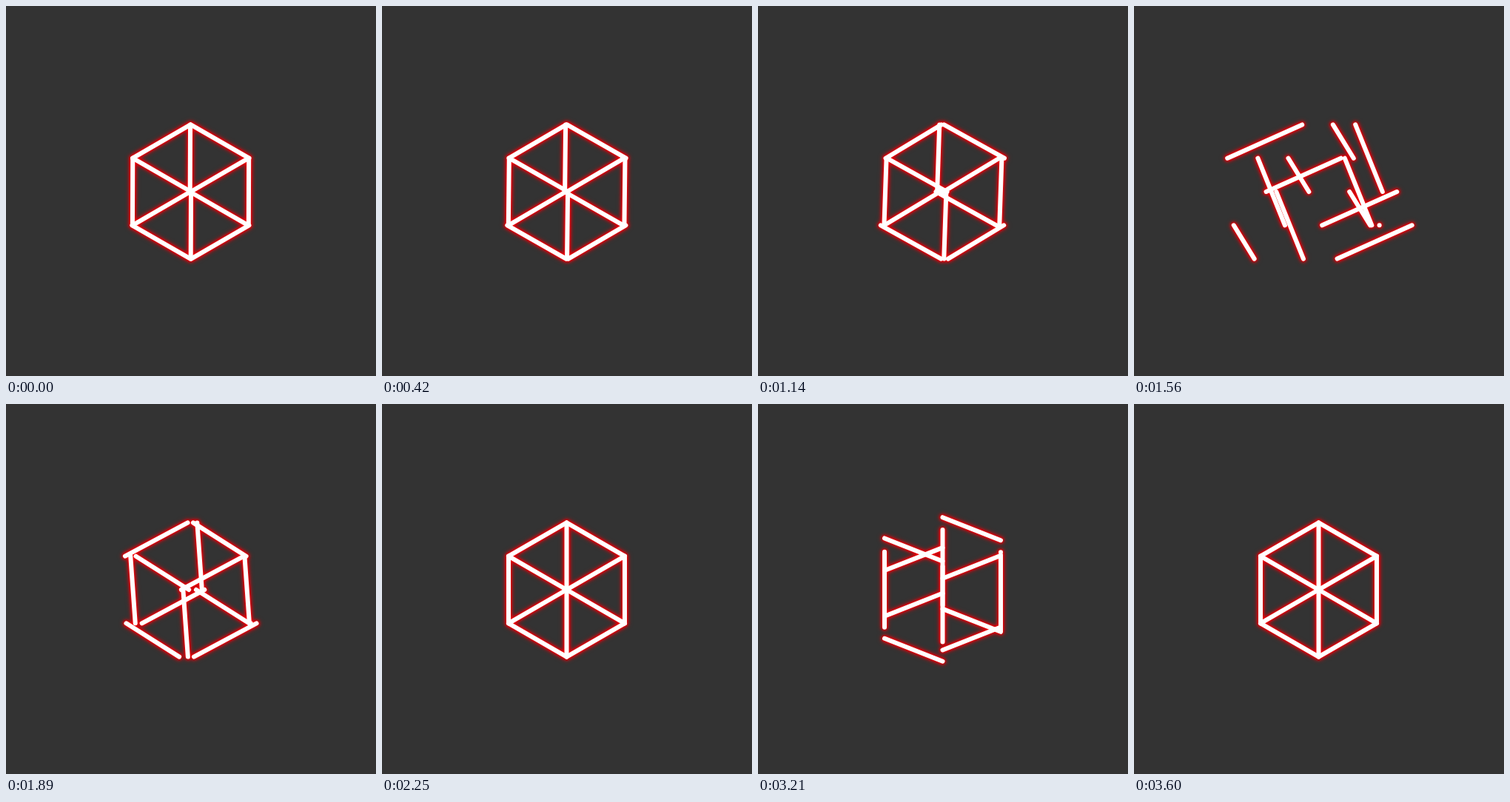
An HTML page without scripts for the animation above (3.63 s loop, 500x500 px).

```html
<!DOCTYPE html>
<html lang="en">
<head>
<meta charset="utf-8">
<title>Neon cube</title>
<style>
  @property --turn { syntax: "<angle>"; inherits: true; initial-value: 0deg; }
  @property --tilt { syntax: "<angle>"; inherits: true; initial-value: 0deg; }

  html, body { margin: 0; width: 100%; height: 100%; overflow: hidden; background: #333; }

  svg {
    --ct: cos(var(--turn)); --st: sin(var(--turn));
    --cp: cos(var(--tilt)); --sp: sin(var(--tilt));
    display: block; width: 100%; height: 100%;
    fill: none; stroke: #fff; stroke-width: 6; stroke-linecap: round;
    filter: drop-shadow(0 0 1px #f00) drop-shadow(0 0 2px #e6000c) drop-shadow(0 0 2.5px #d8000c);
    animation: turn 3630ms infinite, tilt 3630ms infinite;
  }

  /* Edge directions in space */
  .rise { --dx: 78.5; --dy: -45.3; --dz: 64; }
  .fall { --dx: 78.5; --dy: 45.3; --dz: -64; }
  .post { --dx: 0; --dy: 90.6; --dz: 64; }

  /* Orthographic view: turn about the vertical axis, then tilt about the horizontal one */
  path, circle {
    --px: calc(var(--x) * var(--ct) + var(--z) * var(--st));
    --py: calc(var(--y) * var(--cp) + (var(--z) * var(--ct) - var(--x) * var(--st)) * var(--sp));
  }
  path {
    --u: calc(var(--dx) * var(--ct) + var(--dz) * var(--st));
    --v: calc(var(--dy) * var(--cp) + (var(--dz) * var(--ct) - var(--dx) * var(--st)) * var(--sp));
    vector-effect: non-scaling-stroke;
    transform: matrix(var(--u), var(--v), calc(-1 * var(--v)), var(--u), var(--px), var(--py));
  }
  circle {
    fill: #fff; stroke: none;
    transform: matrix(1, 0, 0, 1, var(--px), var(--py));
  }

  @keyframes turn {
    0% { --turn: -.3deg; animation-timing-function: linear; }
    11.57% { --turn: -.9deg; animation-timing-function: linear; }
    31.4% { --turn: -2.8deg; animation-timing-function: ease-in; }
    34.99% { --turn: 0deg; animation-timing-function: cubic-bezier(.5, .1, .75, .6); }
    39.94% { --turn: 90deg; animation-timing-function: cubic-bezier(.3, .45, .7, .85); }
    42.98% { --turn: 145deg; animation-timing-function: cubic-bezier(.3, .45, .7, .75); }
    45.45% { --turn: 155deg; animation-timing-function: cubic-bezier(.3, .65, .5, 1); }
    60.33%, 100% { --turn: 180deg; }
  }
  @keyframes tilt {
    0%, 62% { --tilt: 0deg; animation-timing-function: linear; }
    70.8% { --tilt: -1deg; animation-timing-function: ease-in; }
    74.38% { --tilt: 0deg; animation-timing-function: cubic-bezier(.5, .1, .75, .6); }
    79.34% { --tilt: 92.5deg; animation-timing-function: cubic-bezier(.3, .45, .7, .85); }
    82.37% { --tilt: 146deg; animation-timing-function: cubic-bezier(.3, .45, .7, .75); }
    84.85% { --tilt: 156deg; animation-timing-function: cubic-bezier(.3, .65, .5, 1); }
    99.2%, 100% { --tilt: 180deg; }
  }
</style>
</head>
<body>
<svg viewBox="-249.5 -251 500 500">
  <path class="rise" d="M0 0H1" style="--x:-78.5;--y:-45.3;--z:-30"/>
  <path class="rise" d="M0 0H1" style="--x:0;--y:0;--z:-23"/>
  <path class="rise" d="M0 0H1" style="--x:-78.5;--y:45.3;--z:9"/>
  <path class="rise" d="M0 0H1" style="--x:0;--y:90.6;--z:-152"/>
  <path class="fall" d="M0 0H1" style="--x:0;--y:-90.6;--z:-39"/>
  <path class="fall" d="M0 0H1" style="--x:-78.5;--y:-45.3;--z:-60"/>
  <path class="fall" d="M0 0H1" style="--x:0;--y:0;--z:185"/>
  <path class="fall" d="M0 0H1" style="--x:-78.5;--y:45.3;--z:108"/>
  <path class="post" d="M0 0H1" style="--x:0;--y:-90.6;--z:87"/>
  <path class="post" d="M0 0H1" style="--x:0;--y:0;--z:-100"/>
  <path class="post" d="M0 0H1" style="--x:-78.5;--y:-45.3;--z:-51"/>
  <path class="post" d="M0 0H1" style="--x:78.5;--y:-45.3;--z:-31"/>
  <circle r="3" style="--x:-78.5;--y:45.3;--z:31"/>
</svg>
</body>
</html>
```
